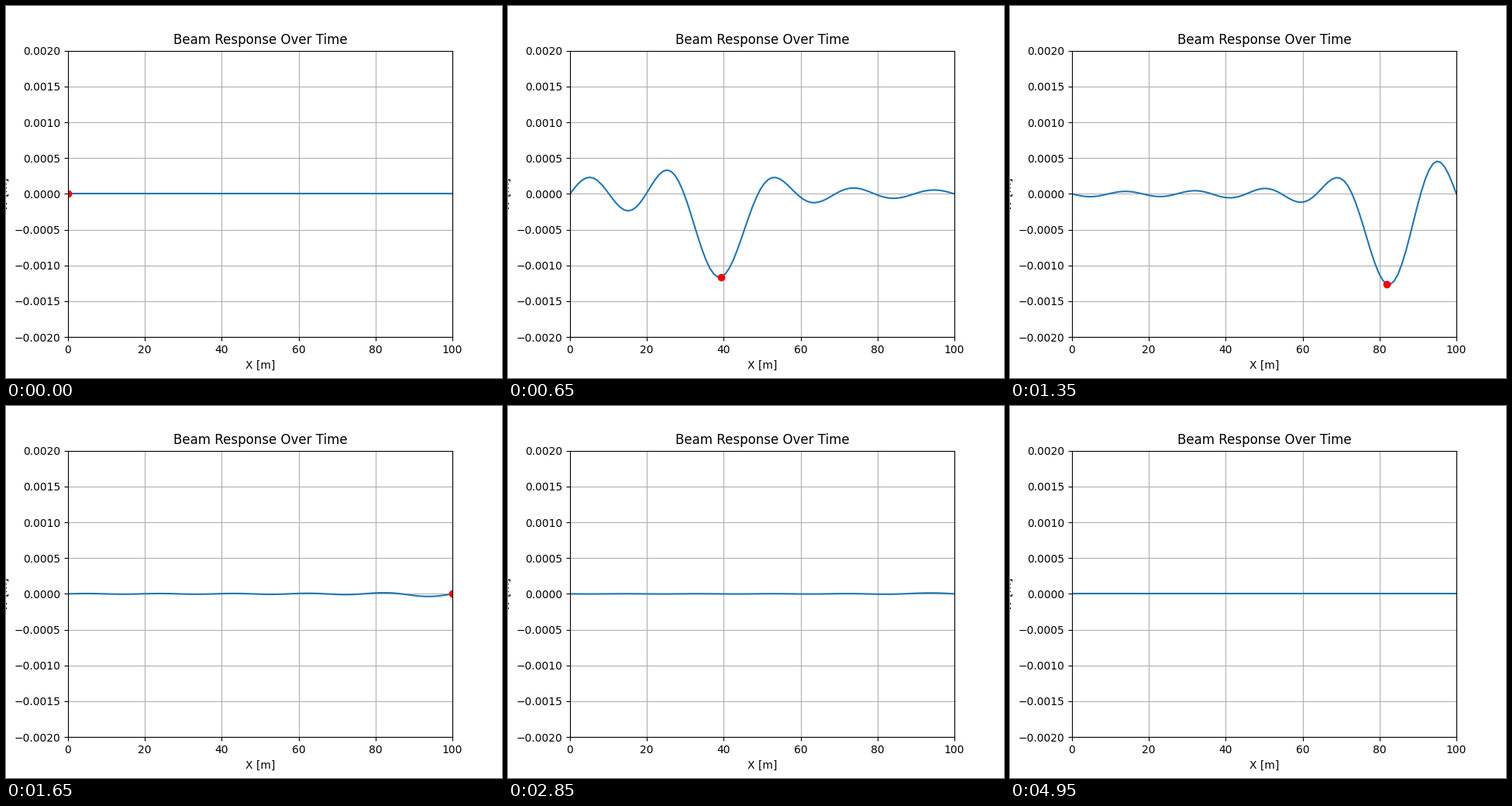
Write a matplotlib script that moves like this. It is 640 by 480 pixels and loops after 5 s.

```python
import numpy as np
import matplotlib.pyplot as plt
from matplotlib.animation import FuncAnimation

LENGTH = 100.0          # beam length [m]
FRAMES = 100
EXIT = 33               # frame at which the load reaches the far end
SAG = 2.2e-4            # static deflection per mode [m]
FREQ = np.pi - 0.188    # damped frequency [rad/frame]
DECAY = 0.14            # damping rate [1/frame]

x = np.linspace(0, LENGTH, 100)
modes = np.arange(1, 11)
shapes = np.sin(np.outer(modes, np.pi * x / LENGTH))

drive = modes * np.pi / EXIT
stiff = FREQ**2 + DECAY**2
gain = SAG * stiff / (stiff - drive**2 + 2j * DECAY * drive)
cos_amp = gain.imag
sin_amp = (DECAY * cos_amp + drive * gain.real) / FREQ


def modal(t):
    """Modal amplitudes t frames after the load enters the beam at rest."""
    forced = -(gain * np.exp(1j * drive * t)).imag
    free = cos_amp * np.cos(FREQ * t) + sin_amp * np.sin(FREQ * t)
    return forced + np.exp(-DECAY * t) * free


def deflection(i):
    if i in (0, FRAMES - 1):
        return np.zeros_like(x)
    q = modal(i)
    if i > EXIT:
        q = q - (-1.0) ** modes * modal(i - EXIT)
    return q @ shapes


fig, ax = plt.subplots(figsize=(6.4, 4.8), dpi=100)
beam, = ax.plot([], [])
load, = ax.plot([], [], "ro")
ax.set_xlim(0, LENGTH)
ax.set_ylim(-0.002, 0.002)
ax.set_xlabel("X [m]")
ax.set_ylabel("W [m]")
ax.set_title("Beam Response Over Time")
ax.grid(True)


def update(i):
    w = deflection(i)
    beam.set_data(x, w)
    if i <= EXIT:
        load.set_data([x[3 * i]], [w[3 * i]])
    else:
        load.set_data([], [])
    return beam, load


anim = FuncAnimation(fig, update, frames=FRAMES, init_func=lambda: update(0),
                     interval=50, repeat=True, repeat_delay=0)
plt.show()
```
